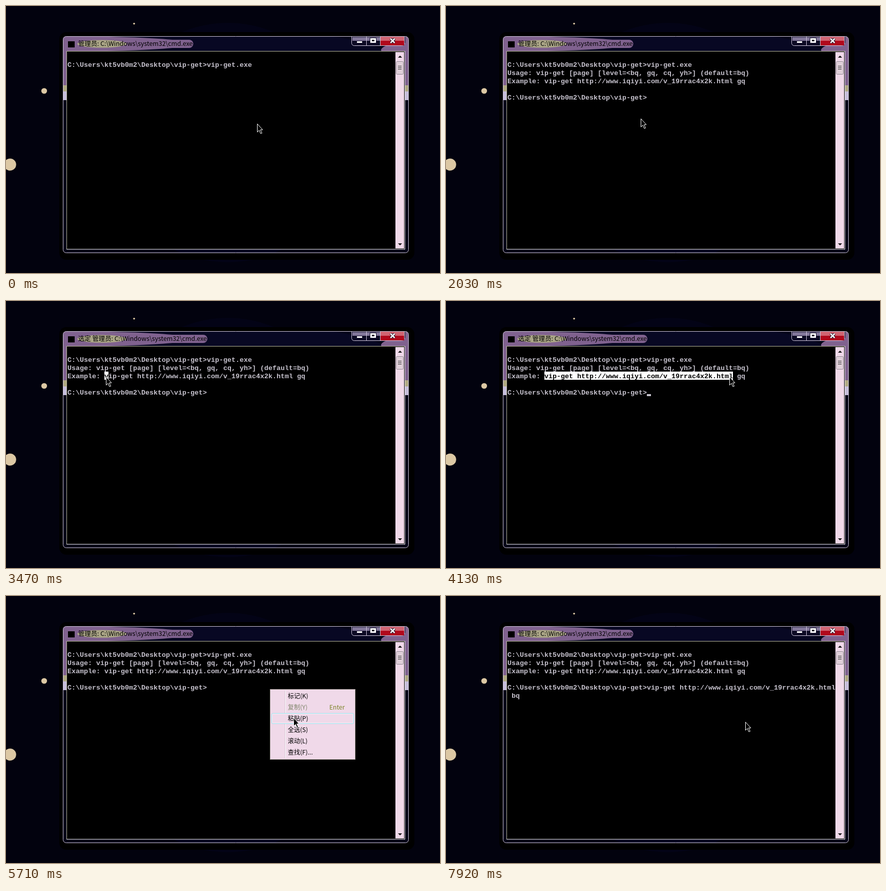
An HTML page with a canvas that plays this animation: 847 by 522 pixels, repeating every 8000 ms.

```html
<!DOCTYPE html>
<html lang="zh">
<head>
<meta charset="utf-8">
<title>cmd</title>
<style>
html, body { margin: 0; width: 100%; height: 100%; overflow: hidden; background: #02020e; }
canvas { display: block; }
</style>
</head>
<body>
<canvas id="stage" width="847" height="522"></canvas>
<script>
const g = document.getElementById('stage').getContext('2d');
const LOOP = 8000, STEP = 60, COL = 8, ROW = 16, LEFT = 120, TOP = 90, ITEM = 22;
const MONO = 'bold 13.333px "Liberation Mono", monospace';
const UI = '"Noto Sans CJK SC", "Noto Sans CJK", "Open Sans", sans-serif';
const PINK = '#f0d9e9', PURPLE = '#80628f', EDGE = '#cfc6dc', SAND = '#dcc8a4';
const NAVY = '#080823', INK = '#c6c2cd';

// Moments at which the user acts
const RUN = 210, OUTPUT = 1250, MENU = 2390, MARK = 2750, GRAB = 3470, DROP = 4440,
  COPY = 5170, MENU2 = 5470, PASTE = 5890, SPACE = 7000, TYPE = 7800;

const prompt = 'C:\\Users\\kt5vb0m2\\Desktop\\vip-get>';
const command = 'vip-get http://www.iqiyi.com/v_19rrac4x2k.html';
const usage = 'Usage: vip-get [page] [level=<bq, gq, cq, yh>] (default=bq)';
const example = `Example: ${command} gq`;
const title = '管理员: C:\\Windows\\system32\\cmd.exe';
const items = ['标记(K)', '复制(Y)', '粘贴(P)', '全选(S)', '滚动(L)', '查找(F)...'];

// Pointer moves: start, length in time, goal
const moves = [
  [OUTPUT, 780, 380, 220], [2030, 300, 275, 145], [MENU, 180, 309, 163],
  [2690, 720, 195, 148], [3530, 600, 553, 148], [DROP, 300, 515, 182],
  [5410, 300, 561, 238], [5830, 300, 584, 246]
];

const within = (t, a, b) => t >= a && t < b;

function pointer(t) {
  let x = 490, y = 230;
  for (const [start, length, toX, toY] of moves) {
    if (t < start) break;
    const p = Math.min(1, Math.floor((t - start) / STEP) * STEP / length);
    x += (toX - x) * p;
    y += (toY - y) * p;
  }
  return [Math.round(x), Math.round(y)];
}

function rect(x, y, w, h, fill) {
  g.fillStyle = fill;
  g.fillRect(x, y, w, h);
}

function round(x, y, w, h, r, fill, stroke) {
  g.beginPath();
  g.roundRect(x, y, w, h, r);
  if (fill) { g.fillStyle = fill; g.fill(); }
  if (stroke) { g.strokeStyle = stroke; g.lineWidth = 1; g.stroke(); }
}

function oval(x, y, rx, ry, fill) {
  g.fillStyle = fill;
  g.beginPath();
  g.ellipse(x, y, rx, ry, 0, 0, 7);
  g.fill();
}

function text(s, x, y, font, fill) {
  g.font = font;
  g.fillStyle = fill;
  g.fillText(s, x, y);
}

function print(s, col, row, fill = INK) {
  text(s, LEFT + col * COL, TOP + row * ROW + 13, MONO, fill);
}

function cells(col, row, count, fill, height = ROW) {
  rect(LEFT + col * COL, TOP + (row + 1) * ROW - height, count * COL, height, fill);
}

function desktop() {
  rect(0, 0, 847, 522, '#02020e');
  oval(433, 267, 234, 234, '#030316');
  oval(250, 34.5, 1.8, 1.8, SAND);
  oval(74.5, 166, 5.6, 5.6, SAND);
  oval(8, 310, 11.8, 11.8, SAND);
  round(104, 51, 693, 445, 14, '#000');
}

function frame() {
  g.save();
  round(111.5, 59.5, 674, 423, 6, '#050518');
  g.clip();
  // Wallpaper seen through the glass
  oval(433, 267, 234, 234, NAVY);
  oval(430, 110, 330, 65, NAVY);
  oval(112, 74, 252, 15, PURPLE);
  oval(786, 86, 54, 14, PURPLE);
  for (const x of [112, 779]) {
    rect(x, 60, 7, 95, PURPLE);
    rect(x, 155, 7, 12, '#b0aa82');
    rect(x, 167, 7, 17, '#c6bedb');
    rect(x, 184, 7, 298, '#050518');
  }
  g.restore();
  round(111.5, 59.5, 674, 423, 6, null, EDGE);
  rect(118, 88, 661, 388, '#f0ecf0');
  rect(118, 88, 660, 387, '#b4b496');
  rect(119, 89, 659, 386, '#000');
}

function titleBar(t) {
  const mark = within(t, MARK, COPY) ? '选定 ' : '';
  const task = within(t, RUN, OUTPUT) ? ' - vip-get.exe' : '';
  const name = mark + title + task, font = `12.35px ${UI}`;
  g.font = font;
  round(138, 66, g.measureText(name).width + 4, 16, 8, PURPLE);
  oval(187, 74, 48, 7.5, '#aaa586');
  text(name, 141, 78, font, '#000');
  rect(121, 69, 13, 12, '#000');
}

function buttons() {
  round(674.5, 59.5, 103, 18, [0, 0, 5, 5], '#0c0a24', EDGE);
  rect(676, 61, 54, 7, '#82779a');
  rect(731, 60, 46, 17, '#b0081c');
  rect(731, 60, 46, 8, '#cf6472');
  for (const x of [703, 730]) rect(x, 60, 1, 17, EDGE);
  // Each glyph is a white shape on a wider dark one
  for (const [color, grow] of [['#14102c', 1], ['#fff', 0]]) {
    rect(685 - grow, 69 - grow, 10 + 2 * grow, 3 + 2 * grow, color);
    rect(711 - grow, 63 - grow, 11 + 2 * grow, 9 + 2 * grow, color);
    g.strokeStyle = color;
    g.lineWidth = 2.6 + 2 * grow;
    g.stroke(new Path2D('M750.5 64l8 8m0-8l-8 8'));
  }
  rect(714, 66, 5, 3, '#14102c');
}

function scrollbar() {
  rect(760, 90, 17, 384, PINK);
  g.fillStyle = '#111';
  g.fill(new Path2D('M765 101l4-4 4 4zM765 464h8l-4 4z'));
  round(761.5, 108.5, 14, 25, 2, '#dfcfd9', '#8f8792');
  for (let y = 117; y < 125; y += 3) rect(765, y, 7, 1, '#333');
}

function caret(t) {
  const phase = t - (t < MARK ? 390 : 4010);
  if (phase < 0 || phase % 1000 >= 500) return;
  const [col, row] = t < OUTPUT ? [0, 2] : t < PASTE ? [prompt.length, 5] : [t < SPACE ? 0 : 1, 6];
  cells(col, row, 1, INK, 4);
}

function consoleText(t) {
  print(prompt + 'vip-get.exe', 0, 1);
  if (t >= OUTPUT) {
    print(usage, 0, 2);
    print(example, 0, 3);
    print(prompt + (t >= PASTE ? command : ''), 0, 5);
  }
  if (t >= TYPE) print('bq'.slice(0, 1 + (t - TYPE) / 120), 1, 6);
}

function selection(t) {
  if (within(t, MARK, GRAB)) cells(0, 0, 1, '#fff');
  if (!within(t, GRAB, COPY)) return;
  const first = example.indexOf(command);
  const end = Math.floor((pointer(Math.min(t, DROP))[0] - LEFT) / COL) + 1;
  cells(first, 3, end - first, '#fff');
  print(example.slice(first, end), first, 3, '#000');
}

function menu(x, y, mx, my) {
  rect(x, y, 167, 138, '#9c958f');
  rect(x + 1, y + 1, 165, 136, PINK);
  rect(x + 29, y + 3, 1, 132, '#d8c6d4');
  rect(x + 30, y + 3, 1, 132, '#fff');
  const hot = Math.floor((my - y - 3) / ITEM), font = `12px ${UI}`;
  if (mx > x && hot >= 0) {
    round(x + 3.5, y + 3.5 + hot * ITEM, 160, 20, 2, PINK, '#98e2ee');
    round(x + 4.5, y + 4.5 + hot * ITEM, 158, 18, 1, null, '#f4f4fa');
  }
  items.forEach((s, i) => {
    const base = y + 18 + i * ITEM, off = i === 1;
    text(s, x + 35, base, font, off ? '#80866c' : '#000');
    if (off) text('Enter', x + 116, base, font, '#7c8426');
  });
}

function arrow(x, y) {
  const outline = new Path2D('M0 0v16l3.5-3.5 3 6.5 2.5-1-3-6.5h4.5z');
  g.save();
  g.translate(x + .5, y + .5);
  g.fillStyle = '#000';
  g.fill(outline);
  g.strokeStyle = '#fff';
  g.lineWidth = 1;
  g.stroke(outline);
  g.restore();
}

function draw(t) {
  const [mx, my] = pointer(t);
  desktop();
  frame();
  titleBar(t);
  buttons();
  scrollbar();
  consoleText(t);
  caret(t);
  selection(t);
  // A menu opens where the pointer was clicked
  for (const [open, close] of [[MENU, MARK], [MENU2, PASTE]])
    if (within(t, open, close)) menu(...pointer(open - STEP), mx, my);
  arrow(mx, my);
}

const start = performance.now();
function tick() {
  draw((performance.now() - start) % LOOP);
  requestAnimationFrame(tick);
}
tick();
</script>
</body>
</html>
```
